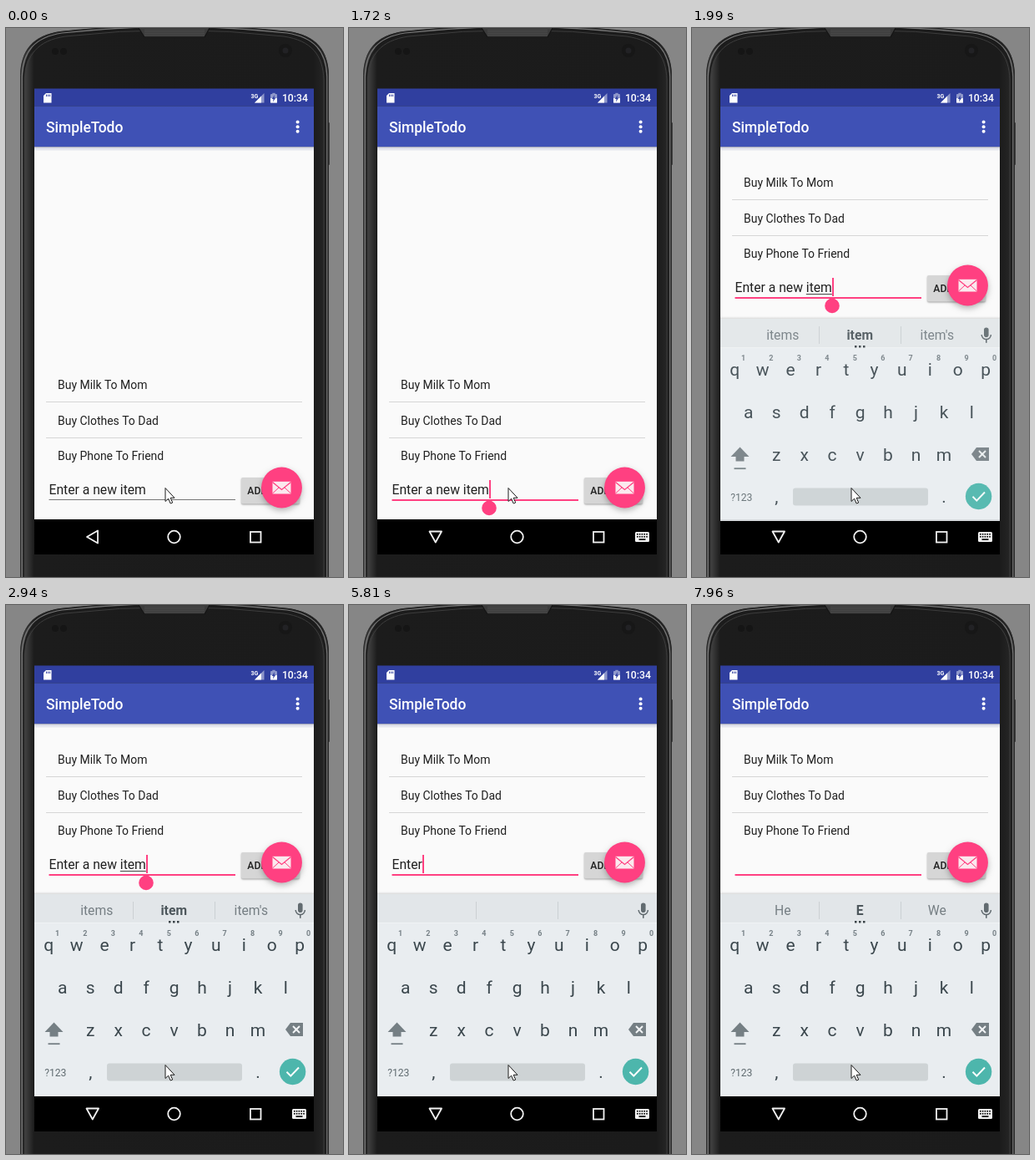
Animation of 404x657 px, one loop 8000 ms. Source, as an HTML page with a canvas:

```html
<!DOCTYPE html>
<html lang="en">
<head>
<meta charset="utf-8">
<title>Todo list</title>
<style>
html, body { margin: 0; width: 100%; height: 100%; overflow: hidden; background: #868686; }
canvas { display: block; }
</style>
</head>
<body>
<canvas id="stage" width="404" height="657"></canvas>
<script>
const ctx = document.getElementById('stage').getContext('2d');
const LOOP = 8000;
const PINK = '#ff4081', INK = '#212121', KEY = '#3b474d', GREY = '#757f84';
const KEYBOARD_SHIFT = 242;

// Typing steps: start time, text, start of the underlined word (-1: none), caret, suggestions
const ITEM = ['items', 'item', "item's"], NEW = ['news', 'new', 'newly'];
const ENT = ['Entire', 'Ent', 'Entered'], E = ['He', 'E', 'We'];
const STEPS = [
  [0, 'Enter a new item', -1, false, ITEM],
  [1400, 'Enter a new item', -1, true, ITEM],
  [1990, 'Enter a new item', 12, true, ITEM],
  [2380, 'Enter a new item', 12, false, ITEM],
  [2940, 'Enter a new item', 12, true, ITEM],
  [5120, 'Enter a new', 8, true, NEW],
  [5270, 'Enter a n', 8, true, NEW],
  [5390, 'Enter a', -1, true, NEW],
  [5540, 'Enter a', 6, true, ['as', 'a', 'at']],
  [5810, 'Enter', -1, true, null],
  [6990, 'Ent', 0, true, ENT],
  [7130, 'En', 0, true, ENT],
  [7250, 'E', 0, true, E],
  [7380, '', -1, true, E],
  [7960, '', -1, false, E]
];

function rect(x, y, w, h, color) {
  ctx.fillStyle = color;
  ctx.fillRect(x, y, w, h);
}

function round(x, y, w, h, r, color) {
  ctx.fillStyle = color;
  ctx.beginPath();
  ctx.roundRect(x, y, w, h, r);
  ctx.fill();
}

function disc(x, y, r, color) {
  ctx.fillStyle = color;
  ctx.beginPath();
  ctx.arc(x, y, r, 0, Math.PI * 2);
  ctx.fill();
}

function trace(points, closed) {
  ctx.beginPath();
  for (let i = 0; i < points.length; i += 2) ctx.lineTo(points[i], points[i + 1]);
  if (closed) ctx.closePath();
}

function poly(points, color) {
  trace(points, true);
  ctx.fillStyle = color;
  ctx.fill();
}

function line(points, color, width, closed) {
  trace(points, closed);
  ctx.strokeStyle = color;
  ctx.lineWidth = width;
  ctx.stroke();
}

function text(str, x, y, size, color, weight = 400, align = 'left') {
  ctx.font = `${weight} ${size}px Roboto, sans-serif`;
  ctx.textAlign = align;
  ctx.fillStyle = color;
  ctx.fillText(str, x, y);
}

function shadow(color, blur, dy) {
  ctx.shadowColor = color;
  ctx.shadowBlur = blur;
  ctx.shadowOffsetY = dy;
}

function fade(y, h, from, to) {
  const g = ctx.createLinearGradient(0, y, 0, y + h);
  g.addColorStop(0, from);
  g.addColorStop(1, to);
  rect(34, y, 335, h, g);
}

// Rounded phone outline, inset from the outer edge
function outline(side, top) {
  const l = 17 + side, r = 387 - side;
  ctx.beginPath();
  ctx.moveTo(l, 660);
  ctx.lineTo(l, 56 + top);
  ctx.bezierCurveTo(l + 1, 26 + top, l + 15, 9 + top, l + 48, 4 + top);
  ctx.quadraticCurveTo(202, top - 11, r - 48, 4 + top);
  ctx.bezierCurveTo(r - 15, 9 + top, r - 1, 26 + top, r, 56 + top);
  ctx.lineTo(r, 660);
}

function ring(side, top, color, width) {
  outline(side, top);
  ctx.strokeStyle = color;
  ctx.lineWidth = width;
  ctx.stroke();
}

function drawPhone() {
  rect(0, 0, 404, 657, '#868686');
  round(385, 113, 3, 51, 1, '#3a3a3a');
  // The left edge catches the light
  const g = ctx.createLinearGradient(17, 0, 387, 0);
  g.addColorStop(0, '#4a4a4a');
  g.addColorStop(.02, '#3c3c3c');
  g.addColorStop(.045, '#1c1c1c');
  g.addColorStop(.95, '#1b1b1b');
  g.addColorStop(1, '#292929');
  outline(0, 0);
  ctx.fillStyle = g;
  ctx.fill();
  ring(.5, .5, '#2a2a2a', 1);
  ring(2.2, 2, '#777', 1.2);
  ring(4, 4, '#1c1c1c', 1.5);
  ring(6, 6, '#3d3d3d', 1);

  poly([159, 0, 244, 0, 238, 11, 166, 11], '#3b3b3b');
  for (let y = 2; y < 10; y += 2) rect(166, y, 72, 1, '#4a4a4a');
  line([159, 0, 166, 11, 238, 11, 244, 0], '#141414', 1.2);
  disc(59, 28, 4, '#151515');
  disc(69, 28, 4, '#151515');
  disc(335, 27, 8, '#171717');
  disc(335, 27, 3.5, '#222225');
}

function drawBars() {
  rect(34, 72.5, 335, 20.9, '#303f9f');
  poly([48, 78, 54.5, 78, 54.5, 89.5, 45, 89.5, 45, 81], '#fff');
  for (let i = 0; i < 3; i++) rect(48 + i * 2, 79.5, 1, 2.5, '#303f9f');
  text('3G', 293.5, 83.5, 7, '#fff', 700);
  poly([309.5, 78, 309.5, 89.5, 298, 89.5], '#8f98cb');
  poly([306, 81.5, 306, 89.5, 298, 89.5], '#fff');
  round(317, 79, 8, 10.5, 1, '#8f98cb');
  rect(319.3, 77.8, 3.4, 1.5, '#8f98cb');
  rect(317, 84, 8, 5.5, '#fff');
  poly([322, 80, 318.8, 85, 320.6, 85, 320, 88.5, 323.3, 83.5, 321.5, 83.5], '#303f9f');
  text('10:34', 362, 88, 12.25, '#fff', 500, 'right');

  rect(34, 93.4, 335, 48.9, '#3f51b5');
  text('SimpleTodo', 48, 124.7, 17.45, '#fff', 500);
  for (let i = 0; i < 3; i++) disc(349.6, 112.6 + i * 5.6, 2, '#fff');
}

function drawFab(y) {
  shadow('rgba(0,0,0,.28)', 7, 3);
  disc(330.5, y, 24.45, PINK);
  shadow('transparent', 0, 0);
  rect(319.5, y - 7.2, 22, 14.7, '#fbe9ee');
  line([319.5, y - 6.5, 330.5, y + 2.5, 341.5, y - 6.5], PINK, 1.3);
  line([319.5, y + 7, 327, y], PINK, 1);
  line([341.5, y + 7, 334, y], PINK, 1);
}

function drawHandle(x, y) {
  ctx.fillStyle = PINK;
  ctx.beginPath();
  ctx.moveTo(x, y - 10);
  ctx.lineTo(x + 6.2, y - 5.8);
  ctx.arc(x, y + .4, 8.8, -Math.PI / 4, Math.PI * 1.25);
  ctx.closePath();
  ctx.fill();
}

function drawContent(t, step, dy) {
  const [, str, mark, caret] = step;
  rect(34, 142.3, 335, 445.7, '#fafafa');
  fade(142.3, 4.7, 'rgba(40,50,120,.2)', 'rgba(40,50,120,.03)');
  ['Buy Milk To Mom', 'Buy Clothes To Dad', 'Buy Phone To Friend'].forEach((s, i) => {
    text(s, 62, 432 + i * 42.6 - dy, 13.96, INK);
    if (i < 2) rect(48, 447 + i * 43 - dy, 307, 1, '#d6d6d6');
  });

  text(str, 51.5, 558 - dy, 15.7, INK);
  const end = 51.5 + ctx.measureText(str).width;
  if (mark >= 0) {
    const start = 51.5 + ctx.measureText(str.slice(0, mark)).width;
    rect(start, 560 - dy, end - start, 1, '#444');
  }
  if (t < 1400) rect(51.5, 564, 223.5, 1, '#767676');
  else rect(51.5, 564 - dy, 223.5, 2, PINK);
  if (caret) rect(Math.round(end), 541 - dy, 2, 22, PINK);

  shadow('rgba(0,0,0,.35)', 2, 1);
  round(282, 538 - dy, 70, 31.5, 2, '#d6d6d6');
  shadow('transparent', 0, 0);
  text('ADD ITEM', 317, 558 - dy, 12.2, INK, 500, 'center');
  drawFab(550 - dy);
  if (t >= 1720 && t < 5120) drawHandle(168, 574 - dy);
}

function drawSuggestions(words) {
  rect(34, 346, 335, 35, '#e2e6e9');
  rect(34, 380, 335, 1, '#f0f3f5');
  rect(152, 355, 1, 21, '#cbd0d3');
  rect(250, 355, 1, 21, '#cbd0d3');
  if (words) {
    words.forEach((w, i) => {
      const mid = i === 1;
      const weight = mid && w !== 'Ent' ? 700 : 400;
      text(w, [108.7, 201.2, 293.8][i], 371, 15.7, mid ? '#4d575c' : '#757e83', weight, 'center');
    });
    for (let i = 0; i < 3; i++) rect(195 + i * 5, 378, 2.5, 2.5, '#394247');
  }
  round(350, 356.5, 5.6, 11.5, 2.8, '#626b70');
  ctx.beginPath();
  ctx.arc(352.8, 365, 5.6, 0, Math.PI);
  ctx.strokeStyle = '#626b70';
  ctx.lineWidth = 1.5;
  ctx.stroke();
  rect(352, 370.5, 1.6, 4.3, '#626b70');
}

function drawKeys() {
  const pitch = 33.45;
  [['qwertyuiop', 51.2, 414], ['asdfghjkl', 67.8, 465], ['zxcvbnm', 101.2, 516]].forEach(([row, x, y]) => {
    [...row].forEach((c, i) => text(c, x + i * pitch, y, 21, KEY, 400, 'center'));
  });
  [...'1234567890'].forEach((c, i) => text(c, 61.5 + i * pitch, 395.5, 9, '#768086', 700, 'center'));

  poly([57.5, 499.5, 68.5, 511, 62.5, 511, 62.5, 516.5, 52.5, 516.5, 52.5, 511, 46.5, 511], GREY);
  rect(50.5, 524.3, 14, 1.8, GREY);
  poly([335, 508, 341, 500, 356, 500, 356, 516, 341, 516], GREY);
  line([344, 504, 352, 512], '#f2f5f6', 2);
  line([352, 504, 344, 512], '#f2f5f6', 2);

  text('?123', 59.3, 563.5, 12.2, '#606b70', 400, 'center');
  text(',', 101.3, 566, 21, KEY, 400, 'center');
  round(121, 548.5, 162, 21, 3, '#ced3d5');
  text('.', 302, 566, 21, KEY, 400, 'center');
  disc(343.6, 558.5, 15.7, '#4db6ac');
  line([336.5, 558.8, 341.3, 563.6, 351, 553.5], '#fff', 2);
}

function drawKeyboard(t, words) {
  const sliding = t < 2110;
  ctx.save();
  ctx.globalAlpha = sliding ? .92 : 1;
  ctx.translate(0, sliding ? 2 : 0);
  fade(343, 3, 'rgba(0,0,0,0)', 'rgba(0,0,0,.13)');
  rect(34, 381, 335, 207, '#e9edf0');
  drawSuggestions(words);
  drawKeys();
  ctx.restore();
}

function drawNav(t) {
  rect(34, 588, 335, 42, '#000');
  const back = t < 1720 ? [97, 609, 110, 601.5, 110, 616.5] : [96.5, 602.5, 111, 602.5, 103.75, 615.5];
  ctx.lineJoin = 'round';
  line(back, '#f2f2f2', 1.8, true);
  ctx.lineJoin = 'miter';
  ctx.beginPath();
  ctx.arc(201.5, 609, 7.3, 0, Math.PI * 2);
  ctx.stroke();
  ctx.strokeRect(293, 603, 12.5, 12.5);
  if (t < 1720) return;
  round(343, 603, 17, 12, 1.5, '#f2f2f2');
  for (let r = 0; r < 2; r++) {
    for (let i = 0; i < 5; i++) rect(345 + i * 2.8, 605 + r * 3, 1.6, 1.6, '#000');
  }
  rect(347.5, 611.3, 8, 1.6, '#000');
}

function drawPointer() {
  const shape = [191, 550.5, 191, 566.5, 194.6, 563.2, 197.2, 569, 199.7, 568, 197.2, 562.3, 202, 562.3];
  poly(shape, '#fff');
  line(shape, '#1c1c1c', 1, true);
}

function draw(t) {
  const step = STEPS.findLast(s => s[0] <= t);
  drawPhone();
  drawBars();
  drawContent(t, step, t < 1860 ? 0 : KEYBOARD_SHIFT);
  drawNav(t);
  if (t >= 1990) drawKeyboard(t, step[4]);
  drawPointer();
}

function tick() {
  draw(performance.now() % LOOP);
  requestAnimationFrame(tick);
}
tick();
</script>
</body>
</html>
```
